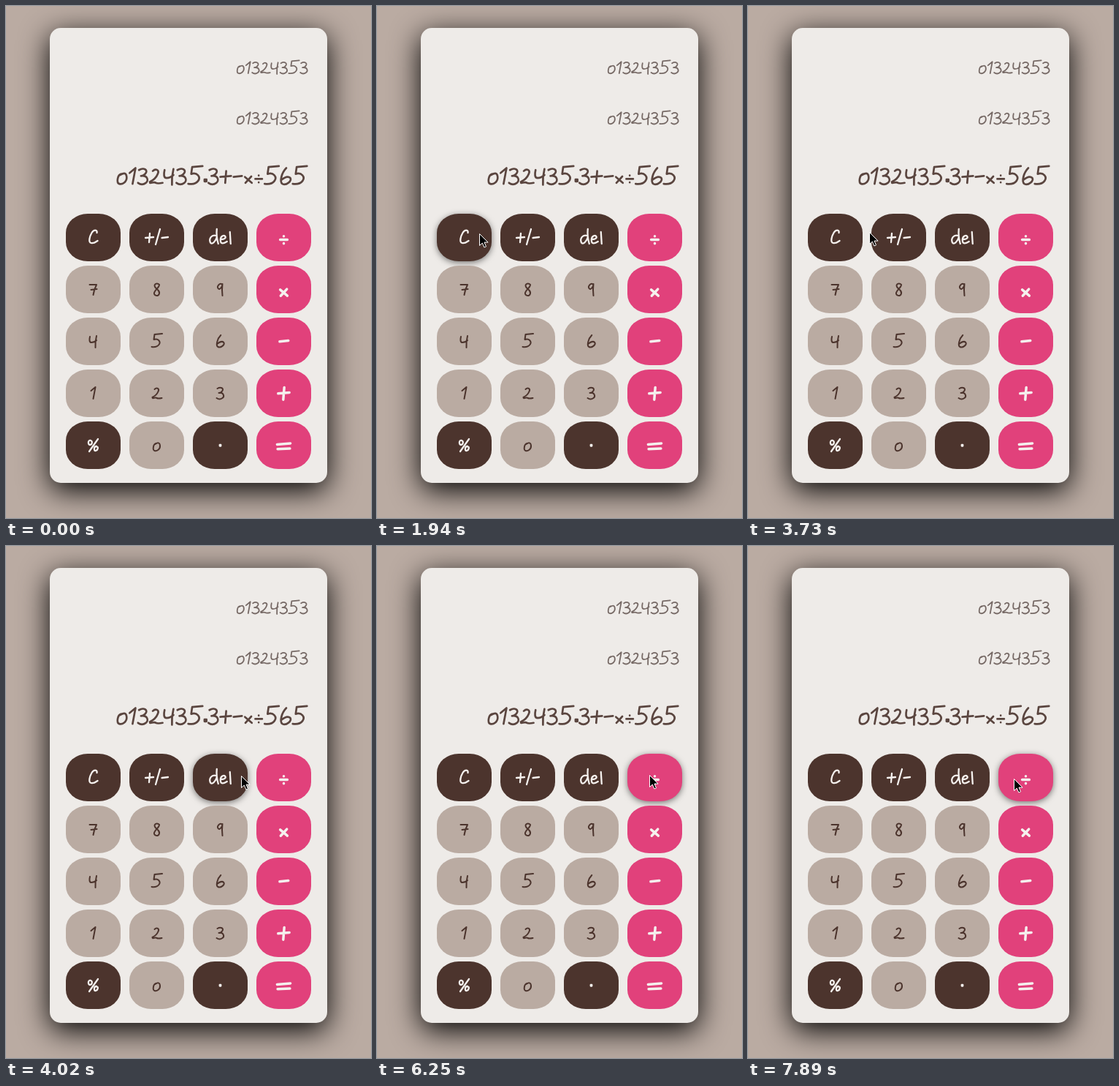
An HTML page for the animation above (8000 ms loop, 500 px wide and 700 px high).

```html
<!DOCTYPE html>
<html lang="en">
<head>
<meta charset="utf-8">
<title>Calculator</title>
<style>
html, body { margin: 0; width: 100%; height: 100%; overflow: hidden; background: #baaba2; }
#stage { position: relative; width: 500px; height: 700px; overflow: hidden; }
#card { position: absolute; left: 60px; top: 30px; width: 380px; height: 622px; border-radius: 15px; background: #eeebe8; box-shadow: 0 10px 40px #000; }
.key { position: absolute; width: 75px; height: 65px; border-radius: 40%; background: #baaba2; }
.dark { background: #4c342d; }
.pink { background: #e1417b; }
.hover { box-shadow: 0 2px 8px rgba(0, 0, 0, .5); }
.press { box-shadow: inset 0 0 18px rgba(0, 0, 0, .55); }
svg { position: absolute; left: 0; top: 0; }
.label { fill: none; stroke-linecap: round; stroke-linejoin: round; }
</style>
</head>
<body>
<div id="stage">
  <div id="card"></div>
  <svg id="ink" width="500" height="700">
    <path id="cursor" d="M0 0V16L3.8 12.6L6.4 18.5L9 17.4L6.5 11.6H11.6Z" fill="#000" stroke="#fff"/>
  </svg>
</div>
<script>
// Handwritten strokes: [advance, path], baseline at y = 0.
const GLYPHS = {
  0: [12, 'M5 -11C1 -10 0 -2 3 -1S11 -3 10.5 -8S7 -12 4 -10'],
  1: [9, 'M1.5 -12L7.5 -17L4.5 -1'],
  2: [14, 'M4 -14C7 -17 11 -15 9 -11Q7 -6 1 -3C1 0 5 -4 7 -2Q9 -1 14 -2'],
  3: [12, 'M2 -15C7 -18 11 -15 9 -12Q7 -9 4 -9C11 -10 12 -4 9 -2Q5 1 1 -2'],
  4: [13, 'M2 -15C1 -11 1 -7 4 -7Q8 -7 11 -10M11 -16Q9 -8 9.5 0'],
  5: [16, 'M15.5 -19L5 -18L4 -11C10 -13 14 -8 11 -4Q8 0 1 -1'],
  6: [12.5, 'M7 -17C2 -12 0 -3 3 -1C7 1 13 -4 11 -7Q8 -10 2 -5'],
  7: [12, 'M1 -15L10.5 -15Q7 -8 6 -1M3 -8L11 -9'],
  8: [11, 'M9 -15C6 -18 1 -16 3 -12S10 -8 9 -3S1 0 2 -4S9 -11 9 -15'],
  9: [10, 'M8 -15C5 -19 0 -13 2 -10S8 -12 8 -16Q7 -8 8 0'],
  '+': [13, 'M1 -8L12 -9M7 -14L6 -2'],
  '-': [11, 'M1.5 -8L10 -9'],
  '×': [11, 'M2 -8L9 -2M8.5 -8.5L2.5 -2'],
  '÷': [10, 'M1.5 -6H8.5M5 -9.5v.1M5 -2.5v.1'],
  '=': [15, 'M1 -9L14 -10M1.5 -4.5L13.5 -5'],
  '.': [4.5, 'M1.5 -5.5h2v2h-2z'],
  '·': [4.5, 'M1.5 -9h1.5v1.5h-1.5z'],
  '%': [17, 'M5 -15C1 -16 1 -9 4 -9S8 -14 5 -15M15 -17L3 0M13 -7C9 -7 9 0 12 -1S16 -6 13 -7'],
  '/': [9, 'M8 -20L2 1'],
  C: [14, 'M12 -15C13 -19 8 -20 5 -15S0 -2 4 -1S10 -2 13 -4'],
  d: [14, 'M10 -11C4 -13 0 -7 2 -2S10 -4 11 -9M11 -20Q10 -10 13 0'],
  e: [11.5, 'M2 -6Q9 -6 9 -9C8 -13 2 -11 2 -5S6 0 11 -3'],
  l: [6, 'M3.5 -16L4.5 0']
};

const ink = document.getElementById('ink');
const cursor = document.getElementById('cursor');

// anchor: share of the text width left of x
function write(text, x, y, scale, anchor, color, weight) {
  let width = 0, body = '';
  for (const ch of text) {
    const [advance, d] = GLYPHS[ch];
    body += `<path d="${d}" transform="translate(${width})"/>`;
    width += advance;
  }
  cursor.insertAdjacentHTML('beforebegin',
    `<g class="label" role="img" aria-label="${text}" stroke="${color}" stroke-width="${weight}"
      transform="translate(${x - width * scale * anchor} ${y}) scale(${scale})">${body}</g>`);
}

write('01324353', 414, 93, .985, 1, '#766965', 1.8);
write('01324353', 414, 162, .985, 1, '#766965', 1.8);
write('0132435.3+-×÷565', 413, 244.5, 1.35, 1, '#5a453f', 2);

const keys = 'C +/- del ÷ 7 8 9 × 4 5 6 - 1 2 3 + % 0 · ='.split(' ').map((text, i) => {
  const col = i % 4, row = i >> 2;
  const pink = col === 3, digit = /\d/.test(text);
  const kind = pink ? 'key pink' : digit ? 'key' : 'key dark';
  const x = 82 + 87 * col, y = 284 + 71 * row;
  const el = document.createElement('div');
  el.style.left = x + 'px';
  el.style.top = y + 'px';
  ink.before(el);
  write(text, x + 37.5, y + (pink ? 44 : 41), pink ? 1.4 : 1, .5,
    digit ? '#4c342d' : '#f5f1ee', pink ? 2.5 : digit ? 2 : 2.3);
  return { el, kind };
});

// [time, cursor x, cursor y, active key, state]
const steps = [[0, -50, -50]];
for (let i = 0; i < 7; i++) {
  const p = 1 - (1 - i / 6) ** 1.6;
  steps.push([300 + i * 890 / 6, 425 - 298 * p, 684 - 375 * p]);
}
steps.push(
  [1940, 140, 311, 0, 'hover'],
  [2085, 168, 313, 1, 'hover'],
  [2230, 192, 314, 1, 'hover'],
  [2830, 177, 313, 1, 'hover'],
  [2980, 150, 312, 0, 'hover'],
  [3130, 136, 311, 0, 'hover'],
  [3730, 166, 309],
  [3875, 236, 311, 1, 'hover'],
  [4020, 322, 314, 2, 'hover'],
  [4460, 314, 314, 2, 'hover'],
  [4610, 310, 315, 2, 'hover'],
  [4910, 310, 315, 2, 'press'],
  [5660, 310, 315, 2, 'hover'],
  [5960, 328, 314, 2, 'hover'],
  [6105, 356, 313, 3, 'hover'],
  [6250, 373, 313, 3, 'hover'],
  [6990, 373, 313, 3, 'press'],
  [7590, 373, 313, 3, 'hover'],
  [7890, 364, 318, 3, 'hover']
);

function draw() {
  const t = performance.now() % 8000;
  const [, x, y, active, state] = steps.findLast(step => step[0] <= t);
  cursor.setAttribute('transform', `translate(${x + .5} ${y + .5})`);
  keys.forEach(({ el, kind }, i) => {
    el.className = i === active ? kind + ' ' + state : kind;
  });
  requestAnimationFrame(draw);
}
draw();
</script>
</body>
</html>
```
